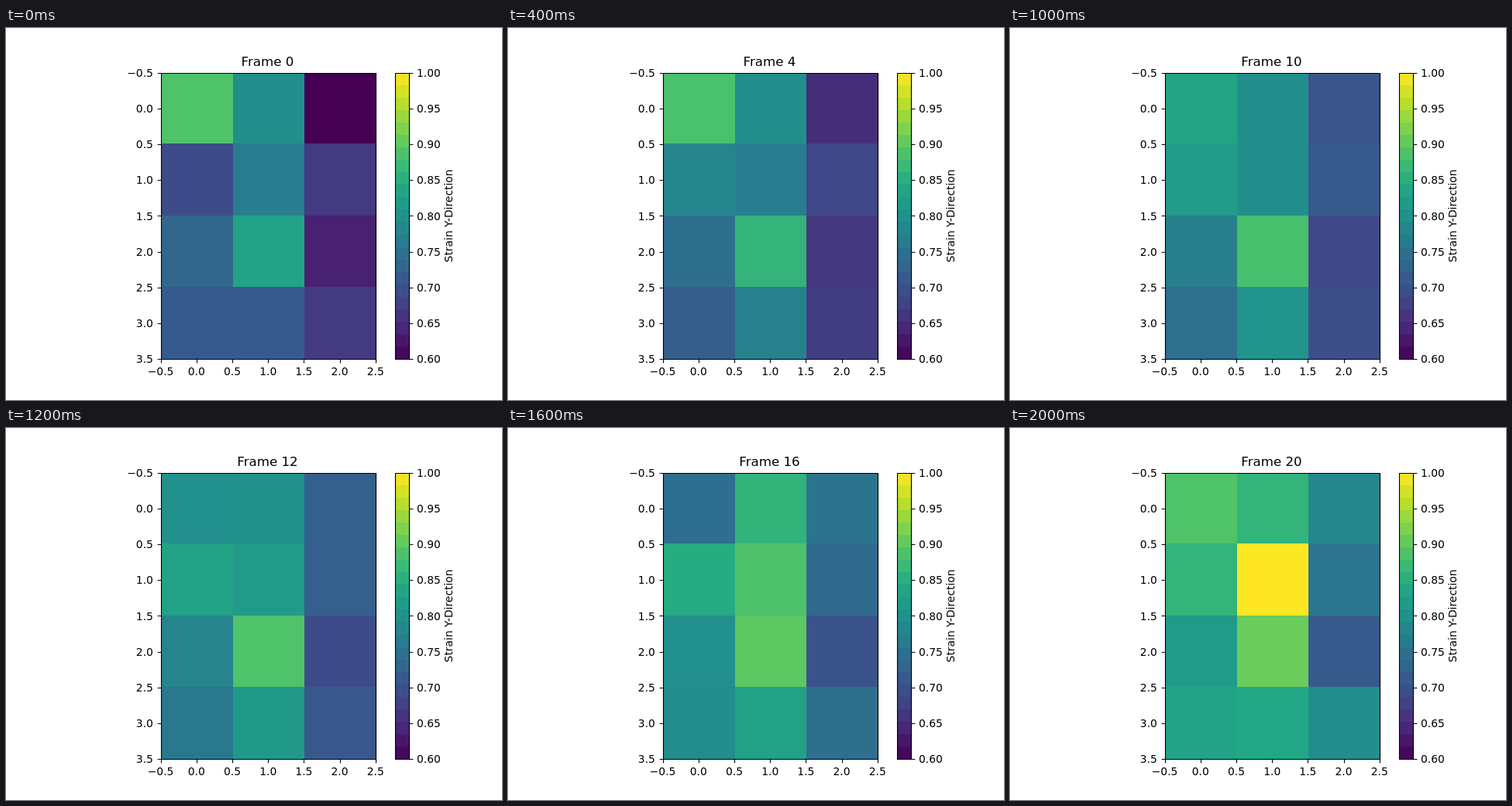
Animation of 640x480 px, one loop 2.1 s. Source, as an HTML page:

```html
<!DOCTYPE html>
<html lang="en">
<head>
<meta charset="utf-8">
<title>Strain map</title>
<style>
  html, body { margin: 0; width: 100%; height: 100%; overflow: hidden; background: #fff; }
  svg { display: block; width: 640px; height: 480px; }
  text { font: 13.889px "DejaVu Sans", Verdana, sans-serif; fill: #000; }
  #title { font-size: 16.667px; }
  .line { fill: none; stroke: #000; stroke-width: 1.11; }
  .fill { shape-rendering: crispEdges; }
</style>
</head>
<body>
<svg id="stage" viewBox="0 0 640 480"></svg>
<script>
const STEP = 100, STEPS = 21, BANDS = 23;
const LEFT = 199.6, TOP = 57.6, CELL = 92.4, HEIGHT = 4 * CELL;

// Viridis at every tenth
const STOPS = "440154 482475 414487 355f8d 2a788e 21918c 22a884 44bf70 7ad151 bddf26 fde725"
  .split(" ").map(hex => [0, 2, 4].map(i => parseInt(hex.slice(i, i + 2), 16)));

// Each cell, row by row: scaled strain from, to, power of the easing, swing on the way
const CELLS = [
  [.72, .72, 3, -.36], [.49, .65, 8, .26], [0, .46, .8],
  [.23, .65, .4], [.42, 1, 3], [.17, .39, 1],
  [.33, .54, 1.1], [.58, .77, .6], [.09, .28, .6],
  [.28, .58, 1.8], [.28, .60, .45], [.17, .49, 2.2]
];

const stage = document.getElementById("stage");
const snap = v => Math.floor(v + 0.5) + 0.5;
const mix = (a, b, k) => a + (b - a) * k;

function add(tag, attrs, text) {
  const el = document.createElementNS("http://www.w3.org/2000/svg", tag);
  for (const name in attrs) el.setAttribute(name, attrs[name]);
  if (text) el.textContent = text;
  return stage.appendChild(el);
}

function block(x0, y0, x1, y1) {
  return add("rect", { class: "fill", x: x0, y: y0, width: x1 - x0, height: y1 - y0 });
}

function line(d) {
  add("path", { class: "line", d });
}

function label(text, x, y, anchor) {
  return add("text", { x, y, "text-anchor": anchor }, text);
}

function viridis(t) {
  const pos = t * (STOPS.length - 1);
  const i = Math.min(Math.floor(pos), STOPS.length - 2);
  const rgb = STOPS[i].map((v, c) => Math.round(mix(v, STOPS[i + 1][c], pos - i)));
  return `rgb(${rgb})`;
}

// Heat map cells
const colEdge = i => Math.round(200 + i * 278 / 3);
const rowEdge = i => Math.max(58, Math.floor(57 + i * 92.5));
const rects = CELLS.map((_, i) => {
  const col = i % 3, row = Math.floor(i / 3);
  return block(colEdge(col), rowEdge(row), colEdge(col + 1), rowEdge(row + 1));
});

// Colour bar
const bandEdge = i => Math.round(TOP + HEIGHT * i / BANDS);
for (let i = 0; i < BANDS; i++) {
  block(502, bandEdge(i), 520, bandEdge(i + 1))
    .setAttribute("fill", viridis(1 - (i + 0.5) / BANDS));
}

// Axes
line("M200.5 58.5H477.5V427.5H200.5Z");
line("M502.5 58.5H520.5V427.5H502.5Z");

const half = i => (i / 2 - 0.5).toFixed(1).replace("-", "\u2212");
for (let i = 0; i < 9; i++) {
  const y = TOP + i * CELL / 2, base = Math.round(y + 5.2);
  line(`M195.6 ${snap(y)}H200.5M520.5 ${snap(y)}H525.4`);
  label(half(i), 189.9, base, "end");
  label((1 - i * 0.05).toFixed(2), 530, base, "start");
}
for (let i = 0; i < 7; i++) {
  const x = LEFT + i * CELL / 2;
  line(`M${snap(x)} 427.5V432.4`);
  label(half(i), x, 448, "middle");
}
add("text", { transform: "translate(576 242.4) rotate(-90)", "text-anchor": "middle" },
  "Strain Y-Direction");
const title = label("Frame 0", 337.5, 49, "middle");
title.id = "title";

function strain([from, to, power, swing = 0], p) {
  const q = p ** power;
  return mix(from, to, q) + swing * Math.sin(Math.PI * q);
}

function draw(step) {
  const p = step / (STEPS - 1);
  rects.forEach((rect, i) => rect.setAttribute("fill", viridis(strain(CELLS[i], p))));
  title.textContent = "Frame " + step;
}

const start = performance.now();
let shown = -1;
function tick() {
  const step = Math.floor((performance.now() - start) / STEP) % STEPS;
  if (step !== shown) draw(shown = step);
  requestAnimationFrame(tick);
}
tick();
</script>
</body>
</html>
```
